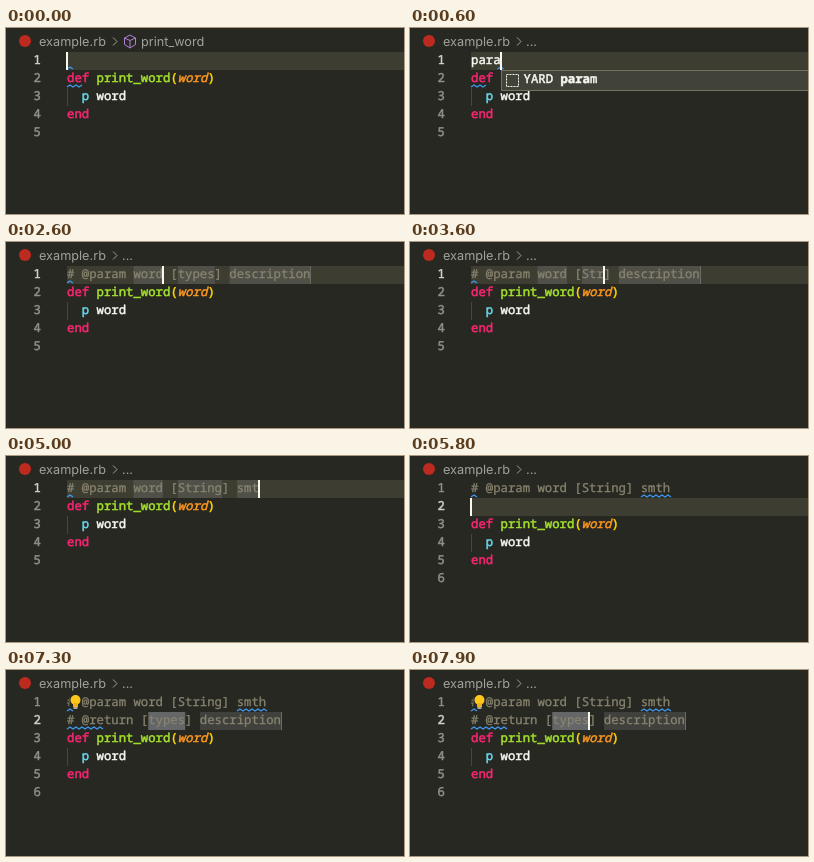
An HTML page with a canvas that plays this animation: 398 by 186 pixels, repeating every 8000 ms.

```html
<!DOCTYPE html>
<html lang="en">
<head>
<meta charset="utf-8">
<title>Editor snippets</title>
<style>
  html, body { margin: 0; height: 100%; overflow: hidden; background: #272822; }
  canvas { display: block; }
</style>
</head>
<body>
<canvas id="stage" width="398" height="186"></canvas>
<script>
const c = document.getElementById('stage').getContext('2d');
c.textRendering = 'geometricPrecision';
c.lineJoin = 'round';

const LOOP = 8000, LEFT = 61, TOP = 24, ROW = 18, CHAR = 7.39;
const MONO = '12.3px "Noto Sans Mono", monospace';
const SANS = '12.7px Inter, sans-serif';
const BACK = '#272822', WHITE = '#f8f8f2', PURPLE = '#b180d7', BLUE = '#3f96e8', GREY = '#a1a19c';

// Text above the method: {placeholder} <selection> | caret, ! hidden caret
const edits = [
  [0, '|'], [100, 'p|'], [300, 'pa|'], [400, 'par|'], [600, 'para|'], [800, 'param|'],
  [1000, '# @param {<name>|} [{types}] {description}'],
  [1600, '# @param {<name>!} [{types}] {description}'],
  [2100, '# @param {w|} [{types}] {description}'],
  [2300, '# @param {wo|} [{types}] {description}'],
  [2400, '# @param {wor|} [{types}] {description}'],
  [2600, '# @param {word|} [{types}] {description}'],
  [2800, '# @param {word} [{<types>|}] {description}'],
  [3300, '# @param {word} [{S|}] {description}'],
  [3600, '# @param {word} [{Str|}] {description}'],
  [3700, '# @param {word} [{Stri|}] {description}'],
  [3900, '# @param {word} [{Strin|}] {description}'],
  [4000, '# @param {word} [{String|}] {description}'],
  [4300, '# @param {word} [{String}] {<description>|}'],
  [4700, '# @param {word} [{String}] {s|}'],
  [4900, '# @param {word} [{String}] {sm|}'],
  [5000, '# @param {word} [{String}] {smt|}'],
  [5100, '# @param {word} [{String}] {smth|}'],
  [5300, '# @param word [String] smth|'],
  [5600, '# @param word [String] smth!'],
  [5800, '# @param word [String] smth\n|'],
  [6300, '# @param word [String] smth\nr|'],
  [6500, '# @param word [String] smth\nre|'],
  [6600, '# @param word [String] smth\nret|'],
  [6700, '# @param word [String] smth\nretu|'],
  [6900, '# @param word [String] smth\n# @return [{<types>!}] {description}'],
  [7900, '# @param word [String] smth\n# @return [{<types>|}] {description}'],
];

const popups = [
  [0, ''],
  [200, 'p pp print printf proc putc puts public_send'],
  [300, 'YARD_param'],
  [1000, ''],
  [6300, 'rawVALUE remove_instance_variable respond_to? respond_to_missing? raise rand readline'],
  [6500, 'remove_instance_variable respond_to? respond_to_missing? readline readlines require require_relative'],
  [6600, 'YARD_return return retry'],
  [6900, ''],
];

const at = (list, t) => list.findLast(([start]) => start <= t)[1];
const colX = col => LEFT + col * CHAR;
const rowY = row => TOP + row * ROW;

function rect(x, y, w, h, color) {
  c.fillStyle = color;
  c.fillRect(x, y, w, h);
}

function text(s, x, y, color, font) {
  c.font = font;
  c.fillStyle = color;
  c.fillText(s, x, y);
}

// A thin outline gives the code font its medium weight
function mono(s, x, y, color, style = '', weight = 0.5) {
  text(s, x, y, color, style + MONO);
  c.strokeStyle = color;
  c.lineWidth = weight;
  c.strokeText(s, x, y);
}

function code(s, col, row, color, style, weight) {
  mono(s, colX(col), rowY(row) + 12, color, style, weight);
}

function stroke(points, color, width = 1) {
  c.strokeStyle = color;
  c.lineWidth = width;
  c.beginPath();
  for (const [x, y] of points) c.lineTo(x, y);
  c.stroke();
}

function squiggle(x, width, row) {
  const points = [];
  for (let i = 0; i * 3 <= width; i++) points.push([x + i * 3, rowY(row) + (i % 2 ? 15 : 17)]);
  stroke(points, BLUE, 1.5);
}

function cube(x, y, color) {
  const p = (dx, dy) => [x + dx, y + dy];
  stroke([p(0, -6.5), p(5.5, -3.5), p(5.5, 3), p(0, 6.5), p(-5.5, 3), p(-5.5, -3.5), p(0, -6.5)], color);
  stroke([p(-5.5, -3.5), p(0, -1), p(5.5, -3.5)], color);
  stroke([p(0, -1), p(0, 6.5)], color);
}

function parse(source) {
  const line = { text: '', slots: [], selection: null, caret: -1, blink: false };
  let slot, select;
  for (const ch of source) {
    const col = line.text.length;
    if (ch === '{') slot = col;
    else if (ch === '}') line.slots.push([slot, col]);
    else if (ch === '<') select = col;
    else if (ch === '>') line.selection = [select, col];
    else if (ch === '|' || ch === '!') { line.caret = col; line.blink = ch === '|'; }
    else line.text += ch;
  }
  return line;
}

function breadcrumb(t) {
  c.fillStyle = '#bd2a20';
  c.beginPath();
  c.arc(19, 13, 6, 0, 7);
  c.fill();
  text('example.rb', 33, 18, GREY, SANS);
  stroke([[107, 9.5], [111, 13.5], [107, 17.5]], GREY);
  if (t < 200) {
    cube(124, 13.5, PURPLE);
    text('print_word', 135, 18, GREY, SANS);
  } else {
    text('...', 116, 18, GREY, SANS);
  }
}

function comment(line, row) {
  const mark = ([from, to], color) => rect(colX(from), rowY(row), (to - from) * CHAR, ROW, color);
  if (line.caret >= 0 && !line.selection) rect(LEFT, rowY(row), 398 - LEFT, ROW, '#3e3d32');
  line.slots.forEach(slot => mark(slot, 'rgba(124,124,124,.3)'));
  if (line.selection) mark(line.selection, 'rgba(135,139,145,.5)');
  if (line.slots.length) rect(Math.floor(colX(line.text.length)), rowY(row), 1, ROW, '#6a6b65');
  if (line.text[0] === '#') code(line.text, 0, row, '#88846f', '', 0.3);
  else code(line.text, 0, row, WHITE);
}

function method(row) {
  code('def', 0, row, '#f92672');
  code('print_word', 4, row, '#a6e22e');
  code('(', 14, row, '#ffd700');
  code('word', 15, row, '#fd971f', 'italic ');
  code(')', 19, row, '#ffd700');
  rect(LEFT, rowY(row + 1), 1, ROW, '#464741');
  code('p', 2, row + 1, '#66d9ef');
  code('word', 4, row + 1, WHITE);
  code('end', 0, row + 2, '#f92672');
}

function popup(labels, typed, row) {
  const x = Math.round(colX(typed.length)), y = rowY(row + 1);
  const height = labels.length * ROW + 3;
  rect(x, y, 420, height, '#75715e');
  rect(x + 1, y + 1, 418, height - 2, '#1e1f1c');
  rect(x + 1, y + 1, 418, ROW + 1, '#414339');
  labels.forEach((name, i) => {
    const label = name.replace('YARD_', 'YARD ');
    const mid = y + 10 + i * ROW, start = label.indexOf(typed), end = start + typed.length;
    if (label === name) {
      cube(x + 10.5, mid, i ? PURPLE : WHITE);
    } else {
      c.setLineDash([2, 1]);
      c.strokeStyle = WHITE;
      c.lineWidth = 1;
      c.strokeRect(x + 5.5, mid - 5.5, 12, 12);
      c.setLineDash([]);
    }
    const part = (from, to, style) =>
      mono(label.slice(from, to), x + 22.5 + from * CHAR, mid + 3, WHITE, style);
    part(0, start);
    part(start, end, 'bold ');
    part(end, label.length);
  });
}

function bulb(x, y) {
  rect(x - 6, TOP, 12, 15, BACK);
  c.fillStyle = '#ffc61c';
  c.beginPath();
  c.arc(x, y, 5, 0, 7);
  c.fill();
  rect(x - 2.5, y + 3, 5, 4, '#eeb018');
  rect(x - 2, y + 7, 4, 2, '#a9a9a4');
}

function draw(t) {
  rect(0, 0, 398, 186, BACK);
  breadcrumb(t);

  const lines = at(edits, t).split('\n').map(parse);
  const active = lines.findIndex(line => line.caret >= 0);
  const { text: typed, caret, blink } = lines[active];

  for (let i = 0; i < lines.length + 4; i++) {
    mono(i + 1, 27.5, rowY(i) + 12, i === active ? '#d0d0cb' : '#90908a');
  }
  lines.forEach(comment);
  method(lines.length);

  if (t >= 7300) bulb(69.5, 30);
  if (t < 2600) {
    squiggle(Math.max(LEFT, colX(typed.length) - 3), 6, 0);
    squiggle(LEFT, 15, 1);
  } else {
    squiggle(LEFT, 8, 0);
  }
  if (t >= 5600) squiggle(colX(23), 30, 0);
  if (t >= 7300) squiggle(LEFT, 5 * CHAR, 1);
  if (blink) rect(Math.floor(colX(caret) - 0.5), rowY(active), 2, ROW, '#f8f8f0');

  const labels = at(popups, t);
  if (labels) popup(labels.split(' '), typed, active);
}

function frame() {
  draw(performance.now() % LOOP);
  requestAnimationFrame(frame);
}
frame();
</script>
</body>
</html>
```
